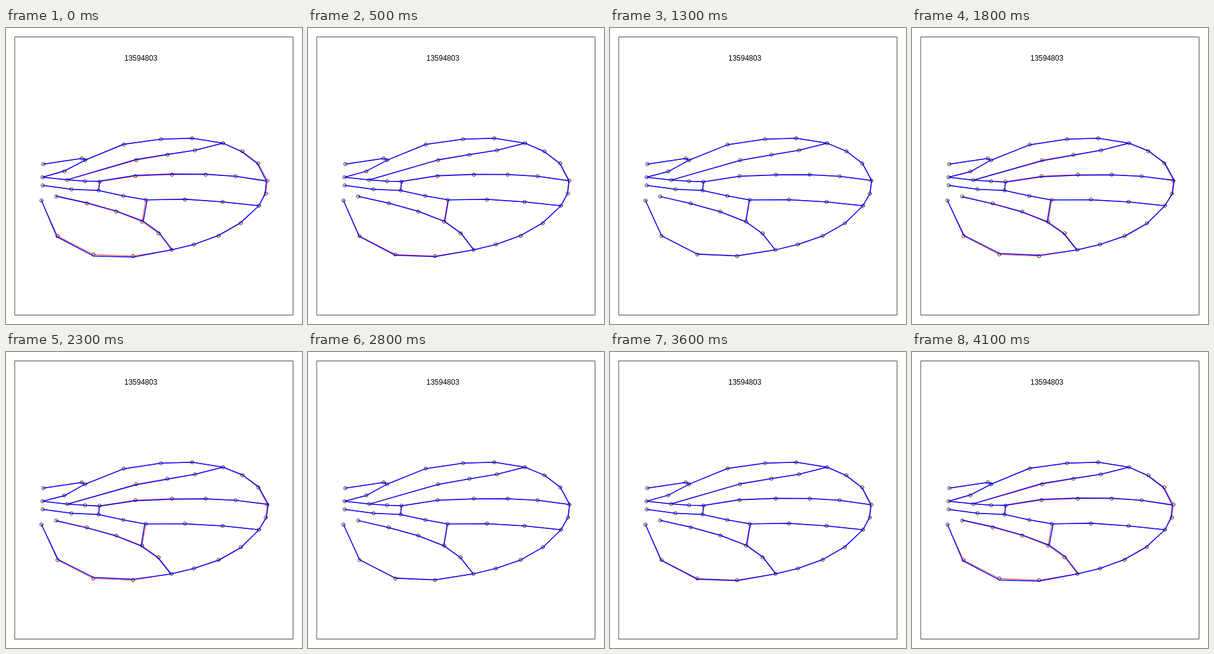
An HTML page for the animation above (4200 ms loop, 480x480 px).

```html
<!DOCTYPE html>
<html lang="en">
<head>
<meta charset="utf-8">
<title>Wing shape</title>
<style>
  html, body { margin: 0; width: 100%; height: 100%; overflow: hidden; background: #fff; }
  svg { display: block; width: 100%; height: 100%; }
  path, circle, rect { fill: none; stroke-linecap: round; stroke-linejoin: round; }
  text { font: 12px "Liberation Sans", Arial, sans-serif; }
</style>
</head>
<body>
<svg viewBox="0 0 480 480">
  <rect x="14.5" y="14.5" width="451" height="451" stroke="#484848"/>
  <text x="192" y="53">13594803</text>
  <g id="landmarks" stroke="#000" stroke-width=".8"></g>
  <path id="mean" stroke="#f00" stroke-width=".8"/>
  <path id="warped" stroke="#00f" stroke-width="1.5"/>
</svg>
<script>
const STEP = 100, STEPS = 21;
const landmarks = [];

// A landmark and the shift it has at the start of the sweep
function pt(x, y, dx = 0, dy = 0) {
  const point = { x, y, dx, dy };
  landmarks.push(point);
  return point;
}

// Landmarks shared by several veins
const base = pt(59.3, 242);
const hinge = pt(128.3, 214.3, 2, -0.8);
const fork = pt(99.3, 246.5, -0.4, -0.4);
const upper = pt(352, 186.8);
const tip = pt(423.9, 247.5, -1.7, 0.7);
const lower = pt(410.2, 288.2);
const heel = pt(268.3, 359.8, 1.3, -0.2);
const crossTop = pt(151.7, 249.2, 0.4, -0.9);
const crossBottom = pt(150.1, 263.4);
const barTop = pt(226.7, 278.7, 2.2, 0);
const barBottom = pt(220.7, 314, 1.9, -0.7);

const veins = [
  [pt(60.5, 220.8), pt(122.9, 211.4), hinge],
  [base, pt(94.6, 232.5, -0.3, -0.7), hinge, pt(190.9, 189, -0.4, -0.5),
    pt(251.4, 180.3), pt(302, 178.8), upper, pt(383.3, 200, -0.8, 0.6),
    pt(409, 219.5, -1, 0.7), tip, pt(421.3, 268.5, -1.2, 0.2), lower,
    pt(380.8, 316.5, -0.7, -0.7), pt(344.8, 337, -0.5, -0.6), pt(304.8, 351),
    heel, pt(206, 369.9, 0.4, 1.6), pt(141.7, 367.3, 0.2, 2.4),
    pt(83.5, 337.3, -1, 1.2), pt(57.5, 279.8)],
  [base, fork, pt(128.3, 248.4), crossTop, pt(210, 240.2, 0, -1.2),
    pt(269, 237.8, 0, -1.1), pt(323.8, 237.8, 0, -0.7), pt(372.4, 240.4), tip],
  [fork, pt(211, 214.4, -0.4, -1.1), pt(261.8, 205.6, -0.2, -0.7), pt(306.4, 198.3), upper],
  [pt(59.5, 255.2), pt(106.3, 261.5), crossBottom, pt(190.2, 272.3), barTop,
    pt(290.2, 278.2, 0, -0.8), pt(351.3, 282), lower],
  [pt(81.4, 273.2, 0, -0.6), pt(131, 284.4, 0.4, -0.9), pt(178.8, 297.7, 0.4, -0.8),
    barBottom, pt(247.4, 333, 1.2, -0.9), heel],
  [crossTop, crossBottom],
  [barTop, barBottom]
];

function outline(shift) {
  const place = p => `${(p.x + p.dx * shift).toFixed(2)} ${(p.y + p.dy * shift).toFixed(2)}`;
  return veins.map(vein => "M" + vein.map(place).join("L")).join("");
}

const byId = id => document.getElementById(id);
byId("landmarks").innerHTML =
  landmarks.map(p => `<circle cx="${p.x}" cy="${p.y}" r="2.7"/>`).join("");
byId("mean").setAttribute("d", outline(0));
const warped = byId("warped");

// Sweep there and back, holding each end for two steps
function draw(ms) {
  const tick = Math.floor(ms / STEP) % (2 * STEPS);
  const step = tick < STEPS ? tick : 2 * STEPS - 1 - tick;
  warped.setAttribute("d", outline(1 - 2 * step / (STEPS - 1)));
}

const start = performance.now();
function loop() {
  draw(performance.now() - start);
  requestAnimationFrame(loop);
}
loop();
</script>
</body>
</html>
```
